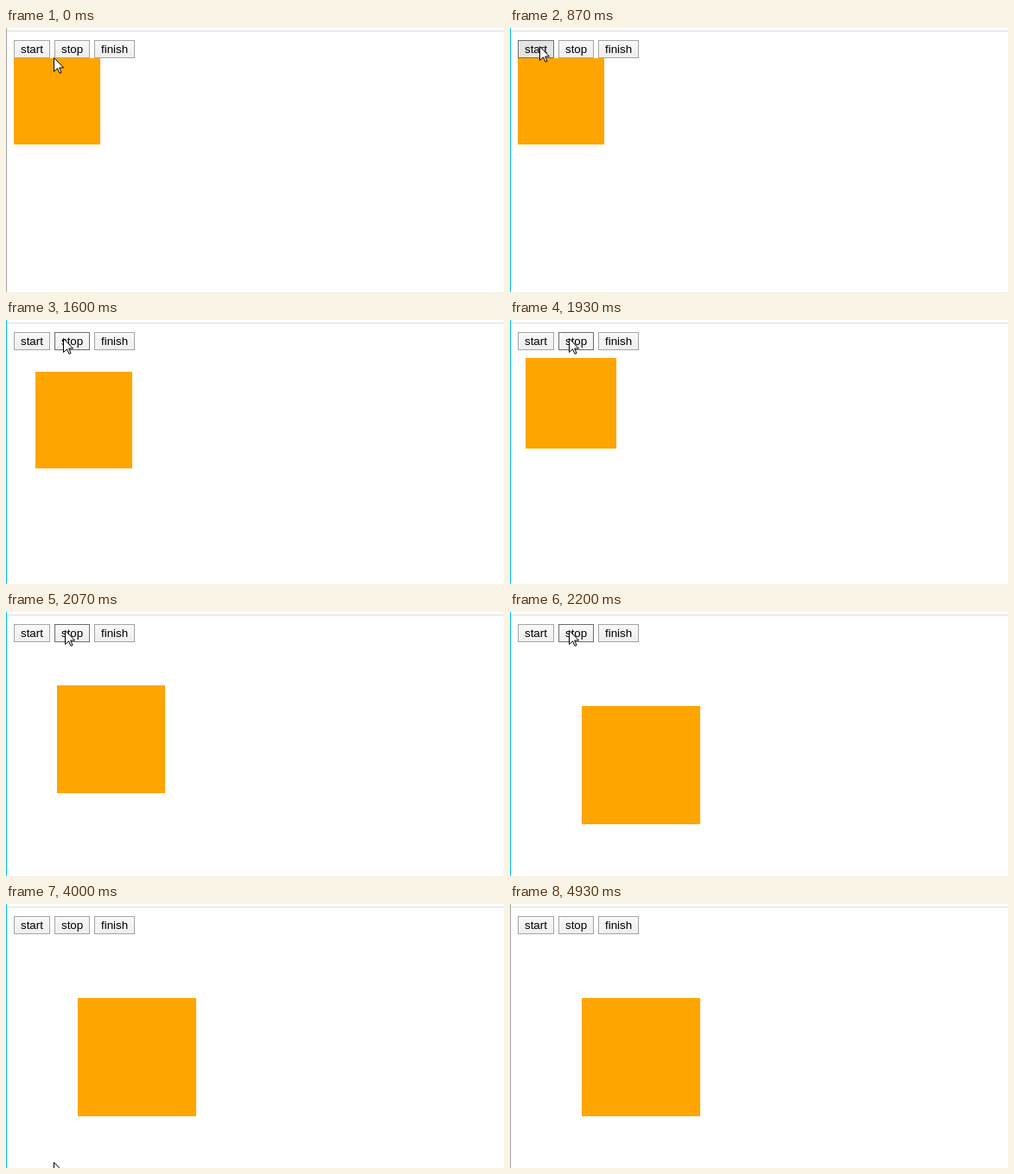
Recreate the animation shown at these times as an HTML page. Size 576 px wide and 306 px high, loop 5140 ms.

```html
<!DOCTYPE html>
<html lang="en">
<head>
<meta charset="utf-8">
<title>Bounce box</title>
<style>
html, body { margin: 0; width: 100%; height: 100%; overflow: hidden; background: #fff; }
svg { display: block; }
text { font: 13.333px Arial, "Liberation Sans", sans-serif; }
.button rect { fill: url(#face); stroke: #a6a6a6; }
.button.hot rect { stroke: #6f6f6f; }
.button.down rect { fill: #e4e4e4; }
</style>
</head>
<body>
<svg width="576" height="306" viewBox="0 0 576 306">
  <defs>
    <linearGradient id="face" x2="0" y2="1">
      <stop stop-color="#f8f8f8"/>
      <stop offset="1" stop-color="#eee"/>
    </linearGradient>
  </defs>
  <rect y="3" width="576" height="1" fill="#ddd"/>
  <rect id="edge" width="1" height="306"/>
  <g class="button"><rect x="9.5" y="14.5" width="41" height="20"/><text x="17" y="29">start</text></g>
  <g class="button"><rect x="56.5" y="14.5" width="40" height="20"/><text x="64" y="29">stop</text></g>
  <g class="button"><rect x="102.5" y="14.5" width="46" height="20"/><text x="110" y="29">finish</text></g>
  <rect id="box" fill="orange"/>
  <path id="cursor" d="M.5 .5V16.5L4.5 12.8L7 18.3L9 17.5L6.7 12H11.5Z" fill="#fff" stroke="#000"/>
</svg>
<script>
const LOOP = 5140, STEP = 1000 / 15;
const CLICK_START = 953, CLICK_STOP = 2175, DURATION = 1500;
const $ = id => document.getElementById(id);
const [edge, box, cursor] = ["edge", "box", "cursor"].map($);
const buttons = [...document.querySelectorAll(".button")];
const spans = [[9, 51], [56, 97], [102, 149]];

// time, x, y of the pointer tip
const path = [
  [0, 55, 34], [333, 34, 21], [1333, 34, 21], [1533, 66, 21], [1667, 66, 21],
  [1800, 68, 21], [3333, 68, 21], [3400, 68, 39], [3467, 68, 72], [3600, 67, 160],
  [3733, 65, 245], [3867, 62, 288], [4000, 55, 299], [4133, 50, 305]
];

function pointer(t) {
  const i = path.findIndex(k => k[0] > t);
  if (i < 1) return path[i ? path.length - 1 : 0].slice(1);
  const [t0, x0, y0] = path[i - 1], [t1, x1, y1] = path[i];
  const k = (t - t0) / (t1 - t0);
  return [Math.round(x0 + (x1 - x0) * k), Math.round(y0 + (y1 - y0) * k)];
}

function easeInBounce(p) {
  let n = 3;
  while (p < (2 ** n - 1) / 11) n--;
  return 4 ** (n - 3) - 7.5625 * ((3 * 2 ** n - 2) / 22 - p) ** 2;
}

function set(el, attrs) {
  for (const name in attrs) el.setAttribute(name, attrs[name]);
}

function draw(t) {
  const p = Math.max(0, Math.min(t, CLICK_STOP) - CLICK_START) / DURATION;
  const shift = 100 * easeInBounce(p);
  const x = Math.round(9 + shift), y = Math.round(35 + shift);
  const size = Math.round(100 + shift / 2);
  set(box, { x, y, width: size, height: size });

  const [cx, cy] = pointer(t);
  set(cursor, {
    transform: `translate(${cx} ${cy})`,
    visibility: t < 4320 ? "visible" : "hidden"
  });

  // hover reacts one step late
  const [hx, hy] = pointer(t - STEP);
  const pressed = (t > 860 && t < CLICK_START) || (t > 2120 && t < CLICK_STOP);
  buttons.forEach((button, i) => {
    const hot = hy >= 14 && hy < 35 && hx >= spans[i][0] && hx < spans[i][1] && t > STEP * 1.5;
    button.classList.toggle("hot", hot);
    button.classList.toggle("down", hot && pressed);
  });

  edge.setAttribute("fill", t > 860 && t < 4920 ? "#00bff3" : "#a0a0a0");
}

const begin = performance.now();
function tick() {
  const t = (performance.now() - begin) % LOOP;
  draw(Math.floor((t + 5) / STEP) * STEP);
  requestAnimationFrame(tick);
}
tick();
</script>
</body>
</html>
```
